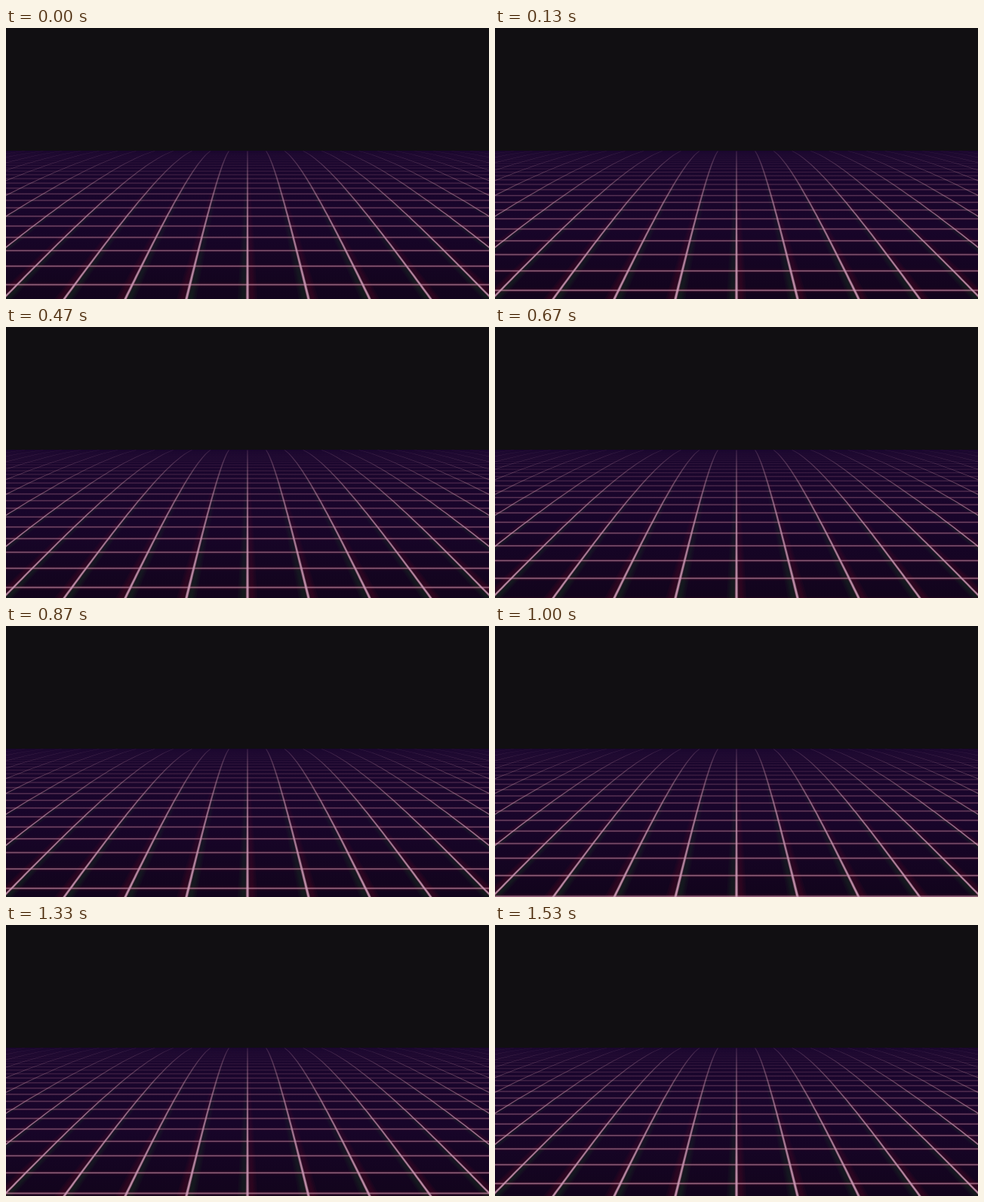
An HTML page with a canvas for the animation above (1560 ms loop, 640 by 360 pixels).

```html
<!DOCTYPE html>
<html lang="en">
<head>
<meta charset="utf-8">
<title>Neon grid</title>
<style>
html, body { margin: 0; width: 100%; height: 100%; overflow: hidden; background: #110f12; }
canvas { display: block; width: 640px; height: 360px; }
</style>
</head>
<body>
<canvas id="stage" width="640" height="360"></canvas>
<script>
const W = 640, H = 360, CX = 320, TOP = 163;
const LOOP = 1560, HOLD = 70, STEP = 100 / 3, STEPS_PER_ROW = 11;
const FAR = 24.6, NEAR = 84;            // column spacing at the horizon and past the bottom
const ROW0 = 0.0131, ROW_GAP = 0.00113; // row depth is 1 / spacing
const ctx = document.getElementById('stage').getContext('2d');

// Screen height of the curved floor where columns are s pixels apart.
const floorY = s => -18 + 4.393 * s + 1804 / s;

// Vertical gradient of one colour, with opacity given at each depth.
function fade(rgb, ...stops) {
  const g = ctx.createLinearGradient(0, TOP, 0, H);
  stops.forEach(([at, alpha]) => g.addColorStop(at, `rgba(${rgb},${alpha})`));
  return g;
}

const floorFill = ctx.createLinearGradient(0, TOP, 0, H);
floorFill.addColorStop(0, '#1a062e');
floorFill.addColorStop(0.5, '#18052a');
floorFill.addColorStop(1, '#12041c');

const colSoft = fade('190,125,160', [0, 0.04], [0.3, 0.16], [1, 0.36]);
const colCore = fade('212,160,188', [0, 0.16], [0.15, 0.3], [0.45, 0.58], [1, 0.82]);
const rowSoft = fade('175,110,140', [0, 0], [0.3, 0.12], [1, 0.25]);
const rowCore = fade('195,135,160', [0, 0], [0.1, 0.08], [0.3, 0.28], [0.6, 0.5], [1, 0.68]);
const redGlow = fade('130,10,35', [0, 0], [0.3, 0.03], [1, 0.09]);
const greenGlow = fade('25,90,30', [0, 0], [0.3, 0.03], [1, 0.09]);

// One column as a ribbon that widens towards the viewer.
function column(n, width, shift, fill) {
  const left = [], right = [];
  for (let s = FAR; s <= NEAR; s += 1) {
    const k = (s - FAR) / (NEAR - FAR);
    const x = CX + n * s + shift * k, w = width(k) / 2, y = floorY(s);
    left.push([x - w, y]);
    right.unshift([x + w, y]);
  }
  ctx.fillStyle = fill;
  ctx.beginPath();
  left.concat(right).forEach(p => ctx.lineTo(...p));
  ctx.fill();
}

function row(y, height, fill) {
  ctx.fillStyle = fill;
  ctx.fillRect(0, y - height / 2, W, height);
}

function draw(step) {
  ctx.fillStyle = '#110f12';
  ctx.fillRect(0, 0, W, H);
  ctx.fillStyle = floorFill;
  ctx.fillRect(0, TOP, W, H - TOP);
  ctx.save();
  ctx.beginPath();
  ctx.rect(0, TOP, W, H - TOP);
  ctx.clip();

  for (let n = -13; n <= 13; n++) {
    const side = n < 0 ? -1 : 1;
    for (const spread of [5, 10, 16]) {
      column(n, k => 1 + spread * k, side * 5, redGlow);
      column(n, k => 1 + spread * k, -side * 5, greenGlow);
    }
  }

  const phase = step % STEPS_PER_ROW / STEPS_PER_ROW;
  for (let i = -1; i < 25; i++) {
    const depth = ROW0 + ROW_GAP * (i - phase);
    if (depth > 1 / FAR) break;
    const y = floorY(1 / depth), k = (y - TOP) / (H - TOP);
    row(y, 2 + 5 * k, redGlow);
    row(y, 1.6 + 1.4 * k, rowSoft);
    row(y, 0.9 + 0.6 * k, rowCore);
  }

  for (let n = -13; n <= 13; n++) {
    column(n, k => 1.8 + 2.6 * k, 0, colSoft);
    column(n, k => 1 + 1.8 * k, 0, colCore);
  }
  ctx.restore();
}

// Steps fall on a 10 ms clock; the first pose is held longer.
function stepAt(t) {
  const tick = Math.floor(t / 10) * 10;
  return tick < HOLD ? 0 : 1 + Math.floor((tick - HOLD + 9.9) / STEP);
}

const start = performance.now();
function frame() {
  draw(stepAt((performance.now() - start) % LOOP));
  requestAnimationFrame(frame);
}
frame();
</script>
</body>
</html>
```
